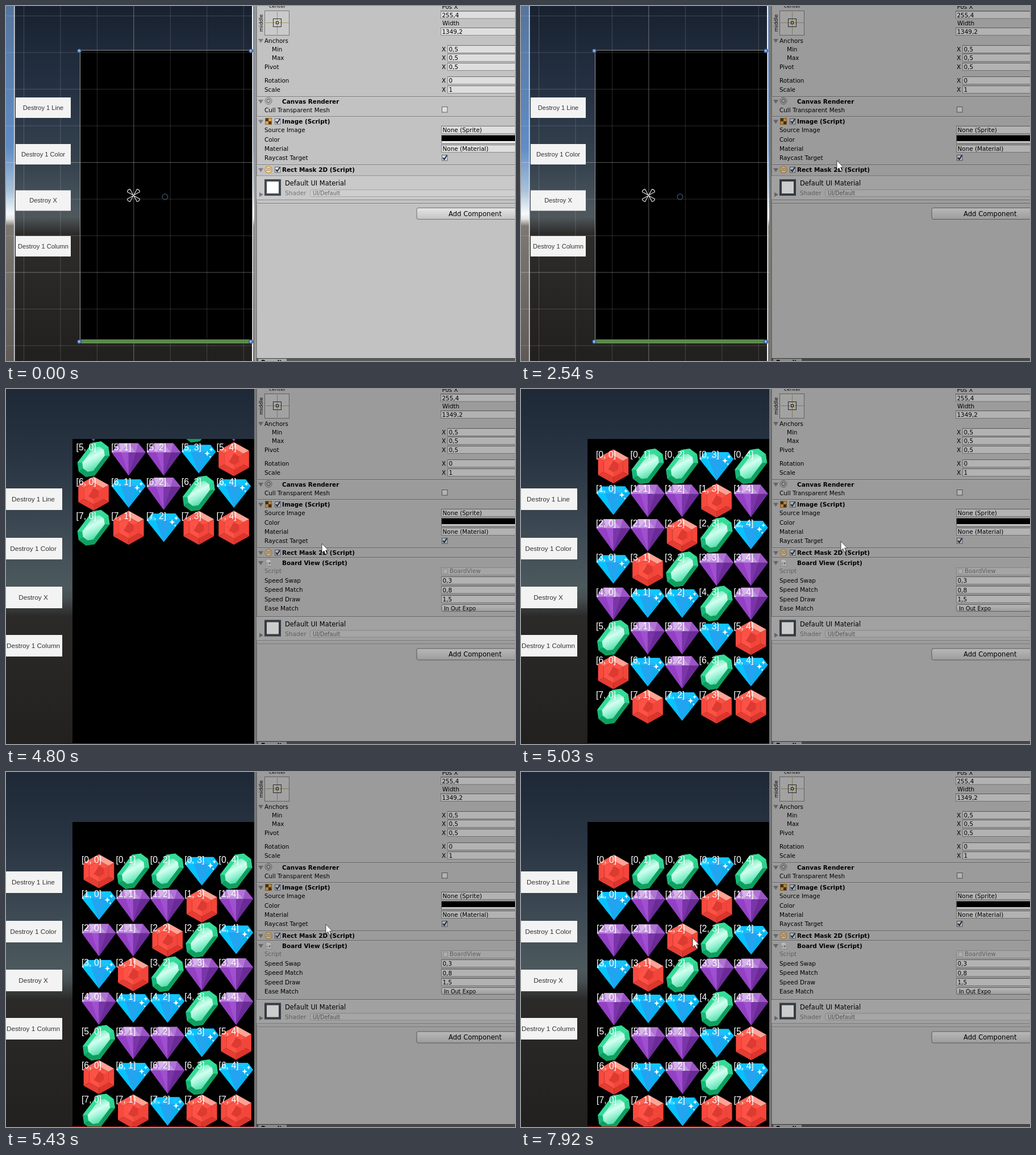
These frames come from a looping animation (896 px wide and 625 px high, 8 s). An HTML page:

```html
<!DOCTYPE html>
<html lang="en">
<head>
<meta charset="utf-8">
<title>Board editor</title>
<style>
html, body { margin: 0; width: 100%; height: 100%; overflow: hidden; background: #000; }
svg { display: block; }
.ui { font-family: "DejaVu Sans", Verdana, sans-serif; }
.btn { font-family: "Liberation Sans", Arial, sans-serif; }
</style>
</head>
<body>
<svg id="stage" width="896" height="625" viewBox="0 0 896 625"></svg>
<script>
const LOOP = 8000, PLAY = 1860, GAME = 4310;
const stage = document.getElementById('stage');

const rect = (x, y, w, h, fill, more = '') =>
  `<rect x="${x}" y="${y}" width="${w}" height="${h}" fill="${fill}" ${more}/>`;
const path = (d, fill, more = '') => `<path d="${d}" fill="${fill}" ${more}/>`;
const circle = (x, y, r, fill, more = '') =>
  `<circle cx="${x}" cy="${y}" r="${r}" fill="${fill}" ${more}/>`;
const group = (body, more = '') => `<g ${more}>${body}</g>`;
const text = (x, mid, s, size = 10.4, more = '') =>
  `<text class="ui" x="${x}" y="${mid + size * 0.37}" font-size="${size}" ${more}>${s}</text>`;
const bold = (x, mid, s) => text(x, mid, s, 10.45, 'font-weight="bold"');
const gradient = (id, stops, dir = 'x2="0" y2="1"') =>
  `<linearGradient id="${id}" ${dir}>` +
  stops.map(([o, c]) => `<stop offset="${o}" stop-color="${c}"/>`).join('') + '</linearGradient>';

const defs = '<defs>' +
  gradient('sky', [[0, '#56759d'], [.4, '#608dc6'], [.52, '#a9c2da'], [.585, '#f7fafc'], [.6, '#e4e4e2'], [.62, '#7d7872'], [1, '#5f5a56']]) +
  gradient('dim', [[0, '#18212f'], [.2, '#232f40'], [.45, '#36434f'], [.57, '#4b575e'], [.595, '#4f575a'], [.64, '#2d2c2b'], [1, '#22201f']]) +
  gradient('game', [[0, '#1e2836'], [.2, '#293543'], [.45, '#424f58'], [.56, '#4c595d'], [.59, '#474f52'], [.64, '#2b2a29'], [1, '#232120']]) +
  gradient('face', [[0, '#e6e6e6'], [1, '#c3c3c3']]) +
  gradient('mint', [[0, '#59e3b0'], [.4, '#d4fff0'], [.62, '#9bf5d6'], [1, '#42d79e']], 'x2="1" y2="1"') +
  '<clipPath id="board"><rect x="117" y="88" width="320" height="537"/></clipPath>' +
  '<clipPath id="left"><rect width="437" height="625"/></clipPath></defs>';

const NAMES = ['Destroy 1 Line', 'Destroy 1 Color', 'Destroy X', 'Destroy 1 Column'];
const buttons = (x, w, h, mid, tops, size) => NAMES.map((s, i) =>
  rect(x, tops[i], w, h, '#f3f3f3') +
  `<text class="btn" x="${mid}" y="${tops[i] + h / 2 + size * .36}" font-size="${size}" fill="#323232" text-anchor="middle">${s}</text>`
).join('');

function sceneView() {
  let s = rect(0, 0, 437, 625, 'url(#sky)') + rect(14, 0, 421, 625, 'url(#dim)');
  s += rect(131, 78, 302, 513, '#000');
  for (let i = 0; i < 10; i++) {
    const strong = i === 4 || i === 7;
    s += rect(0, 17 + i * 64.5, 437, 1, '#fff', `opacity="${strong ? .34 : .17}"`);
    if (i < 7) s += rect(31 + i * 64.45, 0, 1, 625, '#fff', `opacity="${i === 3 ? .36 : .17}"`);
  }
  s += rect(14, 0, 1.5, 625, '#e4e8ec') + rect(433, 0, 2.2, 625, '#f2f2f2');
  s += buttons(17, 97, 36, 65.5, [161, 243, 324.5, 405], 11.1);
  s += rect(130.5, 78, 303, 513, 'none', 'stroke="#9a9a9a"');
  s += rect(131, 587.5, 302, 6, '#2c3526') + rect(131, 587.5, 302, 1.5, '#7fc86a') +
    rect(131, 592, 302, 1.5, '#7fc86a') + rect(131, 590, 302, 1, '#b9b9b9');
  for (const x of [129, 431]) for (const y of [79, 591])
    s += circle(x, y, 3.3, '#6c9be0', 'stroke="#2b4570" stroke-width="1.2"') + circle(x - .6, y - .8, 1.2, '#a9c8f4');
  for (let a = 45; a < 360; a += 90)
    s += path('M0 -1L-3.4 -12Q0 -15 3.4 -12Z', 'none', `stroke="#eee" stroke-width="1.1" transform="translate(224.5 333.5) rotate(${a})"`);
  s += circle(280, 336, 4.8, 'none', 'stroke="#31465a" stroke-width="1.7"');
  return s;
}

// Gems, each drawn around its own centre
function hexPoints(r) {
  return [...Array(6)].map((_, i) => {
    const a = (i * 60 - 90) * Math.PI / 180;
    return `${(r * Math.cos(a) * 1.03).toFixed(1)} ${(r * Math.sin(a)).toFixed(1)}`;
  });
}
function ruby() {
  const out = hexPoints(30), mid = hexPoints(19), core = hexPoints(10);
  const tones = ['#ffa294', '#f4453a', '#dc352c', '#e53d33', '#f9493e', '#ff6253'];
  let s = tones.map((c, i) => {
    const j = (i + 1) % 6;
    return path(`M${out[i]}L${out[j]}L${mid[j]}L${mid[i]}Z`, c);
  }).join('');
  s += path('M' + mid.join('L') + 'Z', '#ff5145');
  s += path(`M${mid[1]}L${mid[2]}L${mid[3]}L0 0Z`, '#f2463b');
  return s + path('M' + core.join('L') + 'Z', '#dd3a31') + path(`M${core[0]}L${core[4]}L${core[5]}Z`, '#f9594d');
}
function emerald() {
  return group(
    path('M-8 -33H8L19 -22V22L8 33H-8L-19 22V-22Z', '#16b877') +
    path('M-8 -33H8L5 -24H-5L-12 -17V17L-19 22V-22Z', '#35dc98') +
    path('M19 -22V22L8 33H-8L-5 24H5L12 17V-17Z', '#0f9f5f') +
    path('M8 -33L19 -22L12 -17L5 -24Z', '#2fd08e') +
    path('M-5 -24H5L12 -17V17L5 24H-5L-12 17V-17Z', 'url(#mint)'), 'transform="rotate(37)"');
}
function amethyst() {
  return path('M-17 -28H17L30 -12L0 29L-30 -12Z', '#9440c4') +
    path('M0 -12H30L0 29Z', '#6a2b96') + path('M-13 -12H0V29Z', '#a04fd0') + path('M0 -12H13L0 29Z', '#7a35a8') +
    path('M-17 -28L-30 -12H-13Z', '#b783d8') + path('M-17 -28H0L-13 -12Z', '#d6b5e8') +
    path('M0 -28L-13 -12H13Z', '#c193de') + path('M0 -28H17L13 -12Z', '#b074d4') + path('M17 -28L30 -12H13Z', '#9a56c4');
}
function sapphire() {
  const star = (x, y, r) => path(`M${x} ${y - r}L${x + r * .28} ${y - r * .28}L${x + r} ${y}L${x + r * .28} ${y + r * .28}L${x} ${y + r}L${x - r * .28} ${y + r * .28}L${x - r} ${y}L${x - r * .28} ${y - r * .28}Z`, '#fff');
  return path('M-21 -25H21L30 -13L0 25L-30 -13Z', '#06c2ff') +
    path('M-14 -13H14L0 25Z', '#22a4f0') + path('M14 -13H30L0 25Z', '#0caeee') +
    path('M-21 -25L-14 -13H-30Z', '#35d2ff') + path('M0 -25L14 -13H-14Z', '#2cb4f6') +
    path('M0 -25H21L14 -13Z', '#14c6ff') + star(15, -10, 5) + star(22, -17, 3.6) + star(20, -4, 2.2);
}
const GEMS = { R: ruby(), G: emerald(), P: amethyst(), B: sapphire() };
const ROWS = ['RGGBG', 'BPPRP', 'PPRGB', 'BRGPP', 'PBBGP', 'GPPBR', 'RBPGB', 'GRBRR'];

function gameView() {
  let gems = '';
  ROWS.forEach((row, r) => [...row].forEach((kind, c) => {
    gems += `<g class="gem">${GEMS[kind]}<text class="btn" x="-30.5" y="-15.2" font-size="15.8" fill="#fff">[${r}, ${c}]</text></g>`;
  }));
  return rect(0, 0, 437, 625, 'url(#game)') +
    buttons(-3, 102, 38, 48, [175, 262, 348, 433], 11.75) +
    rect(117, 88, 320, 537, '#000') + group(gems, 'clip-path="url(#board)"') +
    rect(117, 624, 320, 1, '#a51414');
}

// Inspector parts
const line = y => rect(441, y, 455, 1, '#7c7c7c') + rect(441, y + 1, 455, 1, '#d2d2d2');
const field = (x, mid, s) => rect(x + .5, mid - 6.5, 140, 13, '#dedede', 'stroke="#8c8c8c"') +
  rect(x, mid - 7, 140, 1, '#6e6e6e') + text(x + 2.5, mid + .3, s);
const fold = (x, y) => path(`M${x - 4.5} ${y - 3}H${x + 4.5}L${x} ${y + 4}Z`, '#7d7d7d');
const check = (x, y, on) => rect(x + .5, y + .5, 9.5, 9.5, '#dfdfdf', 'stroke="#646464"') +
  (on ? path(`M${x + 2} ${y + 5}L${x + 4.5} ${y + 8}L${x + 9} ${y + 1}`, 'none', 'stroke="#16305c" stroke-width="2"') : '');
const head = (y, s) => fold(448.5, y) + bold(486, y, s);
const disc = y => circle(462, y, 6, '#e6d9bd', 'stroke="#d08b2c" stroke-width="1.2"');

function inspector() {
  let s = rect(437, 0, 459, 625, '#c2c2c2') + rect(437, 0, 4, 625, '#9a9a9a') + rect(440.5, 0, 1, 625, '#5c5c5c');
  s += rect(455.5, 8.5, 43, 43, '#cacaca', 'stroke="#777"');
  s += path('M477.5 10V50M457 29.5H498', 'none', 'stroke="#a29667"');
  s += rect(470.5, 22.5, 14, 14, 'none', 'stroke="#333"') + rect(475.5, 27.5, 4, 4, '#d8c878', 'stroke="#222"');
  s += text(463, 0, 'center', 9.2);
  s += text(0, 0, 'middle', 9, 'text-anchor="middle" transform="translate(448.5 30) rotate(-90)"');
  s += text(767.5, 1, 'Pos X') + field(765, 15.5, '255,4') + text(768, 30, 'Width') + field(765, 45, '1349,2');
  s += fold(448.5, 61) + text(455, 61, 'Anchors');
  [['Min', 76, '0,5', 468], ['Max', 91, '0,5', 468], ['Pivot', 107, '0,5', 455], ['Rotation', 131, '0', 455], ['Scale', 147, '1', 455]]
    .forEach(([name, y, v, x]) => s += text(x, y, name) + text(767, y, 'X') + field(777, y, v));
  s += line(159) + head(168, 'Canvas Renderer');
  s += circle(462, 167, 6, 'none', 'stroke="#6f6f6f"') + circle(462, 167, 3, 'none', 'stroke="#6f6f6f" stroke-width="1.4"');
  s += text(455, 183, 'Cull Transparent Mesh') + check(767, 177, false);
  s += line(194) + head(203.5, 'Image (Script)') + check(473, 198, true);
  s += rect(456.5, 197.5, 11, 11, '#e3a33f', 'stroke="#9a7030"') + rect(457, 198, 5, 5, '#4a3a24') + rect(462, 203, 5, 5, '#4a3a24');
  s += text(455, 218.5, 'Source Image') + field(766, 218, 'None (Sprite)');
  s += text(455, 235, 'Color') + rect(766, 227, 130, 15, '#777') + rect(767, 228, 129, 10, '#000') + rect(767, 238, 129, 3, '#fff');
  s += text(455, 251, 'Material') + field(766, 251, 'None (Material)');
  s += text(455, 267.5, 'Raycast Target') + check(767, 262, true);
  s += line(279) + head(288.5, 'Rect Mask 2D (Script)') + check(473, 283, true) + disc(288) +
    text(462, 288, '2D', 6.5, 'text-anchor="middle" fill="#8a6220"');

  let v = line(296) + head(306, 'Board View (Script)');
  v += path('M457.500 299.5H464L467.500 303V311.500H457.500Z', '#e4e4e4', 'stroke="#aaa"') + text(458.5, 306.5, 'c#', 6, 'fill="#555"');
  v += text(455, 320.5, 'Script', 10.4, 'fill="#777"') + rect(766.5, 314.5, 140, 13, '#cecece', 'stroke="#a4a4a4"') +
    rect(770, 317, 7, 8, '#dadada', 'stroke="#aaa"') + text(781, 320.5, 'BoardView', 10.3, 'fill="#777"');
  [['Swap', '0,3'], ['Match', '0,8'], ['Draw', '1,5']].forEach(([n, val], i) => {
    const y = 337 + i * 16.4;
    v += text(455, y, 'Speed ' + n) + field(766, y, val);
  });
  v += text(455, 386, 'Ease Match') + rect(766.5, 379.5, 140, 12, 'url(#face)', 'rx="3" stroke="#777"') + text(771, 386, 'In Out Expo', 9.6);
  s += group(v, 'id="view"');

  let m = rect(441, 299, 455, 42, '#c9c9c9') + line(298.5) + line(341) + line(347);
  m += rect(457, 307, 25, 25, '#fff', 'stroke="#434a54" stroke-width="4"');
  m += path('M446 328L453 332L446 336Z', '#7d7d7d');
  m += text(491, 312, 'Default UI Material', 11.45) + text(491, 329.5, 'Shader', 10.6, 'fill="#777"');
  m += rect(535.500, 323.5, 370, 12, '#cfcfcf', 'rx="3" stroke="#a6a6a6"') + text(540, 329.5, 'UI/Default', 9.6, 'fill="#666"');
  m += rect(723, 355.5, 205, 20, 'url(#face)', 'rx="3" stroke="#6f6f6f"') + text(779, 365.5, 'Add Component', 11.6);
  s += group(m, 'id="material"');
  s += rect(441, 620, 455, 5, '#5a5a5a') + rect(441, 620, 455, 1, '#3f3f3f') +
    rect(444, 621, 50, 4, '#a8a8a8') + bold(449, 627, 'Results');
  return s + rect(437, 0, 459, 625, '#000', 'id="tint" opacity=".2"');
}

stage.innerHTML = defs +
  group(sceneView(), 'id="scene" clip-path="url(#left)"') +
  group(gameView(), 'id="play" clip-path="url(#left)"') + inspector() +
  path('M0 0V16.500L3.800 13L6.500 19L9.200 17.800L6.600 12H11.500Z', '#fff', 'id="cursor" stroke="#222" stroke-width=".8"');

const $ = id => document.getElementById(id);
const el = Object.fromEntries(['scene', 'play', 'view', 'material', 'tint', 'cursor'].map(id => [id, $(id)]));
const gems = [...document.querySelectorAll('.gem')];
const show = (node, on) => node.setAttribute('display', on ? 'inline' : 'none');
const move = (node, x, y) => node.setAttribute('transform', `translate(${x.toFixed(2)} ${y.toFixed(2)})`);

// Pointer trips as [ms, x, y]; it rests at the end of each until its last time
const TRIPS = [
  [[760, 45, 581], [1000, 643, 128], [1079, 643, 128]],
  [[2150, 506, 34], [2230, 550, 275], [2310, 540, 268], [2440, 540, 268], [2540, 556, 272], [4840, 556, 272],
   [5000, 563, 268], [5760, 563, 268], [5900, 595, 288], [5980, 616, 300], [6080, 545, 307], [6200, 447, 303],
   [6360, 335, 306], [6500, 275, 292], [6600, 262, 284], [6700, 262, 284], [6820, 266, 278], [6940, 270, 290],
   [7060, 262, 298], [7180, 262, 298], [7310, 255, 262], [7440, 264, 210], [7560, 285, 238], [7680, 300, 285],
   [7790, 298, 306], [7920, 302, 292], [8000, 302, 292]]
];
function pointer(t) {
  for (const trip of TRIPS) {
    for (let i = 1; i < trip.length; i++) {
      const [t0, x0, y0] = trip[i - 1], [t1, x1, y1] = trip[i];
      if (t >= t0 && t < t1) {
        const k = (t - t0) / (t1 - t0);
        return [x0 + (x1 - x0) * k, y0 + (y1 - y0) * k];
      }
    }
  }
  return null;
}

// Share of the fall still to go: in-out expo around its midpoint
function remaining(t) {
  const k = (t - 4834.5) / 69.9;
  if (t > 5575) return 0;
  return k < 0 ? 1 - .5 * 2 ** k : .5 * 2 ** -k;
}

function draw(t) {
  const game = t >= GAME;
  show(el.scene, !game);
  show(el.play, game);
  show(el.view, game);
  show(el.tint, t >= PLAY);
  move(el.material, 0, game ? 101.5 : 0);
  if (game) {
    const left = remaining(t);
    gems.forEach((g, i) => {
      const r = Math.floor(i / 5), c = i % 5;
      move(g, 163.5 + 60.4 * c - (14.7 - 2.1 * c) * left, 175.5 + 60.4 * r - 552 * left);
    });
  }
  const p = pointer(t);
  show(el.cursor, p);
  if (p) move(el.cursor, p[0], p[1]);
}

const start = performance.now();
function tick() {
  draw((performance.now() - start) % LOOP);
  requestAnimationFrame(tick);
}
tick();
</script>
</body>
</html>
```
